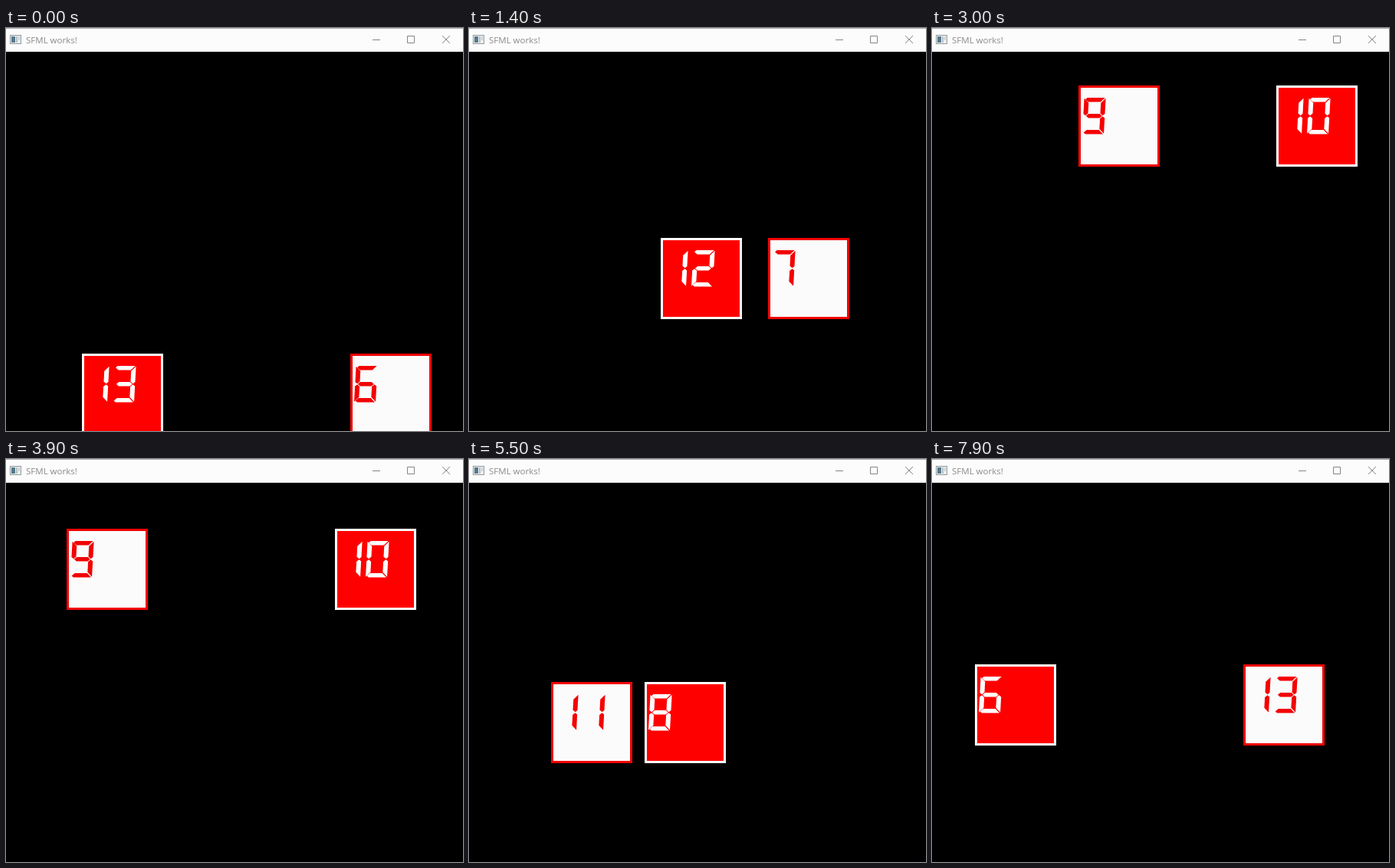
Recreate the animation shown at these times as an HTML page with a canvas. Size 596 by 526 pixels, loop 8 s.

```html
<!DOCTYPE html>
<html lang="en">
<head>
<meta charset="utf-8">
<title>SFML works!</title>
<style>
  html, body { margin: 0; width: 100%; height: 100%; overflow: hidden; background: #000; }
  canvas { position: absolute; left: 0; top: 0; }
  header { position: absolute; left: 0; top: 0; width: 596px; height: 31px; background: #fcfcfc;
    border-top: 1px solid #a9a9ae; box-sizing: border-box; }
  header span { position: absolute; left: 26px; top: 6px; color: #8a8a8a; white-space: nowrap;
    font: 11.5px/17px "Open Sans", "Noto Sans", sans-serif; }
  header svg { position: absolute; left: 0; top: -1px; }
</style>
</head>
<body>
<canvas id="stage" width="596" height="526"></canvas>
<header>
  <svg width="596" height="31" fill="none" stroke="#858585">
    <rect x="5.5" y="9.5" width="14" height="11" fill="#eef1f3" stroke="#92979b"/>
    <g stroke="none">
      <rect x="7" y="11" width="5" height="8" fill="#54798c"/>
      <rect x="13" y="11" width="2" height="8" fill="#b4c0c8"/>
      <rect x="16" y="11" width="2" height="5" fill="#c9d0d4"/>
    </g>
    <path d="M478 15.5h10M523.5 10.5h9v9h-9zM569 10l10 10M579 10l-10 10"/>
  </svg>
  <span>SFML works!</span>
</header>
<script>
(() => {
  const LOOP = 8000, STEP = 100;
  const SIZE = 100, LINE = 3;
  const DIGIT_W = 28, DIGIT_H = 47.6, ADVANCE = 35, SLANT = .055;
  const ctx = document.getElementById("stage").getContext("2d");

  // Seven-segment shapes: two bars drawn once and mirrored, plus the middle bar.
  const flipX = pts => pts.map(([x, y]) => [DIGIT_W - x, y]);
  const flipY = pts => pts.map(([x, y]) => [x, DIGIT_H - y]);
  const upper = [[1.5, 2.2], [4, 0], [27, 0], [21.4, 5.6], [5.4, 5.6]];
  const side = [[28, .8], [28, 21], [25.2, 23.3], [22, 20.6], [22, 6.8]];
  const middle = [[6.7, 26.6], [3.6, 23.8], [6.7, 21]];
  const segments = {
    a: upper,
    b: side,
    c: flipY(side),
    d: flipY(upper),
    e: flipX(flipY(side)),
    f: flipX(side),
    g: [...middle, ...flipX(middle).reverse()]
  };
  const digits = ["abcdef", "bc", "abged", "abgcd", "fgbc", "afgcd", "afgedc", "abc", "abcdefg", "abcdfg"];

  // Pixels travelled along each axis; the pace picks up early on.
  const distance = sec => Math.floor(Math.max(107.8 * sec, 124.6 * sec - 23));

  function bounce(p, lo, hi) {
    const span = hi - lo;
    const turn = 2 * span;
    const u = ((p - lo) % turn + turn) % turn;
    return lo + span - Math.abs(span - u);
  }

  function drawNumber(n, left, y, color) {
    ctx.fillStyle = color;
    [...String(n)].forEach((digit, i) => {
      for (const key of digits[digit]) {
        ctx.beginPath();
        for (const [px, py] of segments[key]) {
          ctx.lineTo(left + i * ADVANCE + px + (DIGIT_H - py) * SLANT, y + py);
        }
        ctx.fill();
      }
    });
  }

  function drawBox(x, y, n, fill, line) {
    ctx.fillStyle = line;
    ctx.fillRect(x, y, SIZE + 2 * LINE, SIZE + 2 * LINE);
    ctx.fillStyle = fill;
    ctx.fillRect(x + LINE, y + LINE, SIZE, SIZE);
    drawNumber(n, x + 5, y + 16, line);
  }

  function draw(sec) {
    const s = distance(sec);
    const count = Math.floor(sec);
    const y = bounce(s - 371, 27, 429);
    ctx.fillStyle = "#000";
    ctx.fillRect(0, 0, 596, 526);
    drawBox(bounce(449 + s, -7, 495), y, 6 + count, "#fbfbfb", "#f40000");
    drawBox(bounce(99 + s, -7, 495), y, 13 - count, "#ff0000", "#ffffff");
  }

  const start = performance.now();
  function tick() {
    const t = (performance.now() - start) % LOOP;
    draw(Math.floor(t / STEP) * STEP / 1000);
    requestAnimationFrame(tick);
  }
  tick();
})();
</script>
</body>
</html>
```
